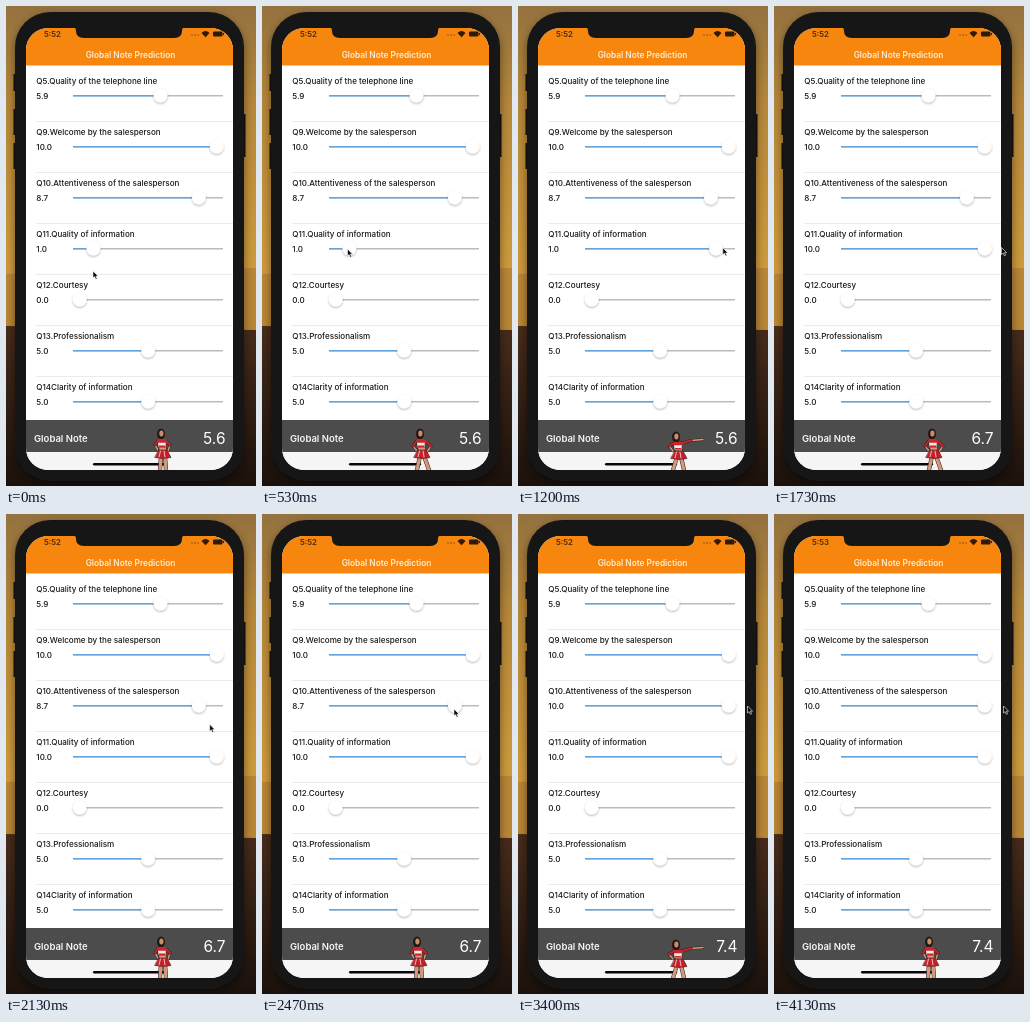
Write an HTML page that moves like this. It is 250x480 px and loops after 4.19 s.

```html
<!DOCTYPE html>
<html lang="en">
<head>
<meta charset="utf-8">
<title>Global Note Prediction</title>
<style>
  html, body { margin: 0; width: 100%; height: 100%; overflow: hidden; background: #21160f; }
  svg { display: block; width: 250px; height: 480px; font: 8.05px Inter, "Open Sans", sans-serif; }
</style>
</head>
<body>
<svg id="stage" viewBox="0 0 250 480">
  <defs>
    <linearGradient id="sky" x2="0" y2="1">
      <stop offset="0" stop-color="#94713f"/>
      <stop offset=".3" stop-color="#b58739"/>
      <stop offset=".8" stop-color="#cd9a3c"/>
    </linearGradient>
    <linearGradient id="sand" x2="0" y2="1">
      <stop offset="0" stop-color="#482c1b"/>
      <stop offset="1" stop-color="#1b110c"/>
    </linearGradient>
    <filter id="soft" x="-50%" y="-50%" width="200%" height="200%">
      <feDropShadow dx="0" dy="1.2" stdDeviation="1.3" flood-opacity=".3"/>
    </filter>
    <filter id="glow" x="-10%" y="-10%" width="120%" height="120%">
      <feDropShadow dx="0" dy="4" stdDeviation="5" flood-opacity=".45"/>
    </filter>
    <clipPath id="screen"><rect x="20" y="22" width="207" height="442" rx="22"/></clipPath>
  </defs>
  <rect width="250" height="325" fill="url(#sky)"/>
  <path d="M0 268L250 262V330H0z" fill="#b98636"/>
  <path d="M0 320L250 324V480H0z" fill="url(#sand)"/>
  <path d="M9 68v17M9 103v26M9 137v26M238 108v43" stroke="#17120e" stroke-width="3"/>
  <rect x="9" y="6" width="229" height="469" rx="35" fill="#161617" filter="url(#glow)"/>
  <g clip-path="url(#screen)">
    <rect x="20" y="22" width="207" height="442" fill="#fff"/>
    <rect x="20" y="22" width="207" height="37.5" fill="#f6860d"/>
    <path d="M66 21q4 0 4 4q0 7 8 7h90q8 0 8-7q0-4 4-4z" fill="#161617"/>
    <text id="clock" x="38" y="31" font-size="7.8" font-weight="600" fill="#4b2a08"></text>
    <g fill="#70400e">
      <circle cx="186" cy="29" r=".7"/><circle cx="189" cy="29" r=".7"/><circle cx="192" cy="29" r=".7"/>
    </g>
    <path d="M195.5 27q4-4 8 0l-4 4.2z" fill="#2e1a08"/>
    <rect x="207" y="25.5" width="9.5" height="5" rx="1.2" fill="#2e1a08"/>
    <path d="M217.5 27v2" stroke="#2e1a08"/>
    <text x="124.5" y="51.5" font-size="8.3" font-weight="600" fill="#fdebd3" text-anchor="middle">Global Note Prediction</text>
    <g id="rows"></g>
    <rect x="20" y="414" width="207" height="32" fill="#4c4c4c"/>
    <rect x="20" y="446" width="207" height="18" fill="#f5f5f5"/>
    <text x="28" y="436" font-size="9.5" font-weight="600" fill="#f4f4f4">Global Note</text>
    <text id="score" x="219.5" y="438" font-size="15.5" fill="#fff" text-anchor="end"></text>
    <rect x="87" y="457" width="72" height="2.6" rx="1.3" fill="#080808"/>
    <g id="dancer" stroke-linecap="round" stroke-linejoin="round" fill="none"></g>
  </g>
  <path id="cursor" d="M0 0v7l1.6-1.4 1.2 2.7 1.3-.6-1.2-2.5h2.2z" fill="#080808" stroke="#fff" stroke-width=".6"/>
</svg>
<script>
const LOOP = 4190, SWAY = 2200;
const $ = id => document.getElementById(id);
const questions = [
  ['Q5.Quality of the telephone line', 5.9],
  ['Q9.Welcome by the salesperson', 10],
  ['Q10.Attentiveness of the salesperson', 8.7],
  ['Q11.Quality of information', 1],
  ['Q12.Courtesy', 0],
  ['Q13.Professionalism', 5],
  ['Q14Clarity of information', 5]
];
const thumbX = value => 73.7 + 13.7 * value;

$('rows').innerHTML = questions.map(([label], i) => `
  <g transform="translate(0 ${51 * i})">
    <g fill="#181818" font-weight="500">
      <text x="30.3" y="77.5">${label}</text>
      <text class="value" x="30.3" y="92.5"></text>
    </g>
    <path d="M67 89.8H217" stroke="#bcbcbe" stroke-width="1.4"/>
    <path class="fill" stroke="#62a5de" stroke-width="1.5"/>
    <circle class="thumb" cy="89.5" r="6.9" fill="#fff" filter="url(#soft)"/>
    ${i < 6 ? '<path d="M30 115.5H227" stroke="#e6e6e6" stroke-width=".8"/>' : ''}
  </g>`).join('');
const [values, fills, thumbs] = ['.value', '.fill', '.thumb'].map(s => document.querySelectorAll(s));

// Eased value at time t from [time, value] keys.
function at(t, keys) {
  const i = keys.findIndex(k => k[0] > t);
  if (i < 0) return keys[keys.length - 1][1];
  if (!i) return keys[0][1];
  const [[t0, a], [t1, b]] = [keys[i - 1], keys[i]];
  const u = (t - t0) / (t1 - t0);
  return a + (b - a) * u * u * (3 - 2 * u);
}

const cursorX = [[60, 87], [480, 85.5], [650, 85.5], [1388, 227.5], [1780, 227.5], [2350, 192], [2650, 192], [3130, 229.5]];
const cursorY = [[60, 265], [480, 243], [650, 243], [1388, 241.5], [1780, 241.5], [2350, 195], [2650, 195], [3130, 192]];
const drags = { 3: [[650, 1], [1337, 10]], 2: [[2650, 8.7], [3050, 10]] };
const release = { 3: 1500, 2: 3150 };

// Joints for standing, hands on hips and pointing.
const joints = {
  head: [155, 427, 158, 427, 158, 430],
  neck: [156, 433.5, 159, 433.5, 160, 436],
  hip: [157, 446, 160, 446, 161, 447],
  elbowL: [149, 439, 151, 440, 151, 440],
  handL: [152, 444, 155, 445, 155, 445],
  elbowR: [164, 439, 169, 440, 173, 434.5],
  handR: [162, 445, 165, 446, 185, 433.5],
  feet: [154, 160, 155, 167, 155, 166]
};
const sway = [[300, 0], [530, 1], [850, 2], [1350, 2], [1730, 1], [1930, 0]];

function drawDancer(t) {
  const k = at(t % SWAY, sway), i = Math.min(Math.floor(k), 1), u = k - i;
  const p = {};
  for (const name in joints)
    p[name] = [0, 1].map(c => joints[name][2 * i + c] * (1 - u) + joints[name][2 * i + 2 + c] * u);
  const { head: [x, y], neck: [nx, ny], hip: [hx, hy], elbowL, handL, elbowR, handR, feet } = p;
  const line = (d, color, width) => `<path d="${d}" stroke="${color}" stroke-width="${width}"/>`;
  const limb = (d, color, width) => line(d, '#38201c', width + 1) + line(d, color, width);
  const armL = `M${nx - 4} ${ny + 1}L${elbowL}`, armR = `M${nx + 4} ${ny + 1}L${elbowR}`;
  $('dancer').innerHTML =
    limb(`M${hx - 2} ${hy + 4}L${feet[0]} 464`, '#d09a7c', 3.2) +
    limb(`M${hx + 2} ${hy + 4}L${feet[1]} 464`, '#d09a7c', 3.2) +
    limb(`M${elbowL}L${handL}`, '#d4987a', 1.5) + limb(armL, '#c9232c', 2) +
    limb(`M${elbowR}L${handR}`, '#d4987a', 1.5) + limb(armR, '#c9232c', 2) +
    `<ellipse cx="${x}" cy="${y + 1}" rx="4" ry="5.6" fill="#291711"/>
    <path d="M${nx - 4} ${ny}h8L${hx + 3.5} ${hy - 1}h-7z" fill="#d4987a" stroke="#38201c" stroke-width=".6"/>
    <path d="M${nx - 4.5} ${ny}h9l-.8 8h-7.2z" fill="#efe8e4" stroke="#38201c" stroke-width=".5"/>
    <path d="M${nx - 4.5} ${ny}h9l-.4 3.2h-8.2zM${nx - 3} ${ny + 6}h6v1.5h-6z" fill="#ce232e"/>
    <path d="M${hx - 4} ${hy - 2}h8l4 7.5q-8 2-16 0z" fill="#c91e29" stroke="#38201c" stroke-width=".6"/>
    <path d="M${hx - 2.5} ${hy - 1}l-1.5 6M${hx + 1} ${hy - 1}l1 6" stroke="#f0e6e2" stroke-width=".8"/>
    <ellipse cx="${x + .4}" cy="${y + .5}" rx="2.1" ry="3" fill="#c88c6e"/>`;
}

function render(t) {
  questions.forEach(([, start], i) => {
    const x = thumbX(drags[i] ? at(t, drags[i]) : start);
    values[i].textContent = (t >= release[i] ? 10 : start).toFixed(1);
    fills[i].setAttribute('d', `M67 89.8H${x}`);
    thumbs[i].setAttribute('cx', x);
  });
  $('score').textContent = t < release[3] ? '5.6' : t < release[2] ? '6.7' : '7.4';
  $('clock').textContent = t < 3800 ? '5:52' : '5:53';
  $('cursor').setAttribute('transform', `translate(${at(t, cursorX)} ${at(t, cursorY)})`);
  drawDancer(t);
}

const begin = performance.now();
function tick() {
  render((performance.now() - begin) % LOOP);
  requestAnimationFrame(tick);
}
tick();
</script>
</body>
</html>
```
